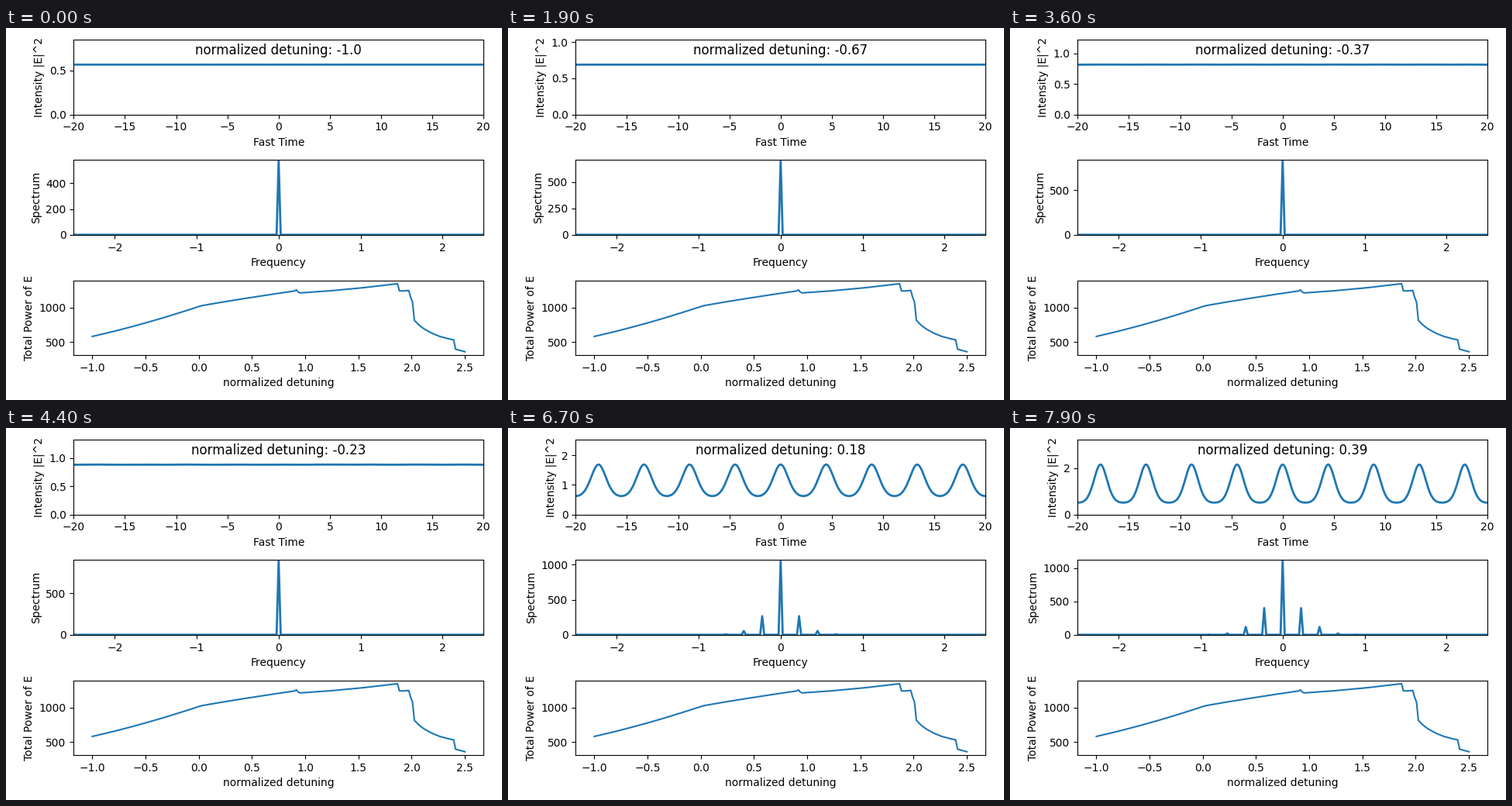
Recreate the animation shown at these times as a matplotlib script. Size 640x480 px, loop 8000 ms.

```python
import numpy as np
import matplotlib.pyplot as plt
from matplotlib.animation import FuncAnimation

W, H, DPI = 640, 480, 100
FRAMES = 80
SPAN, N = 40, 1024
PUMP, SEED = 1.4, 1.5e-4

detuning = np.linspace(-1, 2.5, 200)
t = np.linspace(-SPAN / 2, SPAN / 2, N, endpoint=False)
freq = np.fft.fftshift(np.fft.fftfreq(N, SPAN / N))


def lle_scan(values, modes=16, dt=4.0, steps=60):
    """Relax the Lugiato-Lefever equation at each detuning; return |E|^2 on t."""
    k = 2 * np.pi * 9 / SPAN
    n = np.arange(modes)
    theta = (n + 0.5) * np.pi / modes
    basis = np.cos(np.outer(theta, n))
    inverse = np.linalg.inv(basis)
    d2 = basis @ np.diag(-(n * k) ** 2) @ inverse
    to_t = np.cos(np.outer(t, n * k)) @ inverse
    a, b = np.full(modes, 0.405), np.full(modes, 0.635)
    eye = np.eye(2 * modes) / dt
    out = []
    for d in values:
        for _ in range(steps):
            power = a * a + b * b
            da = -a + (d - power) * b - d2 @ b + PUMP
            db = -b + (power - d) * a + d2 @ a + SEED * np.cos(theta)
            jac = np.block([
                [np.diag(-1 - 2 * a * b), np.diag(d - power - 2 * b * b) - d2],
                [np.diag(power - d + 2 * a * a) + d2, np.diag(-1 + 2 * a * b)],
            ])
            step = np.linalg.solve(eye - jac, np.concatenate([da, db]))
            a, b = a + step[:modes], b + step[modes:]
        out.append((to_t @ a) ** 2 + (to_t @ b) ** 2)
    return np.array(out)


intensity = lle_scan(detuning[:FRAMES])
spectrum = np.abs(np.fft.fftshift(np.fft.fft(intensity, axis=1), axes=1))

# Total power: computed for the scanned part, key points for the rest
keys = np.array([
    (0.65, 1183), (0.9, 1239), (0.917, 1255), (0.935, 1222), (0.952, 1211),
    (1.2, 1237), (1.5, 1279), (1.867, 1344), (1.884, 1241), (1.92, 1239),
    (1.972, 1248), (1.99, 1150), (2.0075, 1078), (2.025, 814), (2.07, 742),
    (2.12, 686), (2.19, 627), (2.265, 580), (2.335, 551), (2.3945, 531),
    (2.412, 396), (2.5, 359),
])
total = np.interp(detuning,
                  np.append(detuning[:FRAMES], keys[:, 0]),
                  np.append(intensity.sum(axis=1), keys[:, 1]))

fig = plt.figure(figsize=(W / DPI, H / DPI), dpi=DPI)


def panel(top, xlabel, ylabel):
    left, right, height = 87.4, 616.2, 96.5
    ax = fig.add_axes([left / W, 1 - (top + height) / H,
                       (right - left) / W, height / H])
    ax.set_xlabel(xlabel)
    ax.set_ylabel(ylabel)
    return ax


ax_time = panel(15, "Fast Time", "Intensity |E|^2")
ax_freq = panel(170.3, "Frequency", "Spectrum")
ax_power = panel(325.6, "normalized detuning", "Total Power of E")

wave, = ax_time.plot(t, intensity[0], lw=2)
lines, = ax_freq.plot(freq, spectrum[0], lw=2)
ax_power.plot(detuning, total)
ax_time.set_xlim(-20, 20)
ax_freq.set_xlim(-2.5, 2.5)
title = ax_time.set_title("", y=1.0, pad=-14)


def update(i):
    wave.set_ydata(intensity[i])
    lines.set_ydata(spectrum[i])
    ax_time.set_ylim(0, 1.5 * intensity[i].max())
    ax_freq.set_ylim(0, spectrum[i].max())
    title.set_text(f"normalized detuning: {round(float(detuning[i]), 2)}")
    return wave, lines, title


anim = FuncAnimation(fig, update, frames=FRAMES, interval=100,
                     repeat=True, repeat_delay=0, blit=False)
plt.show()
```
